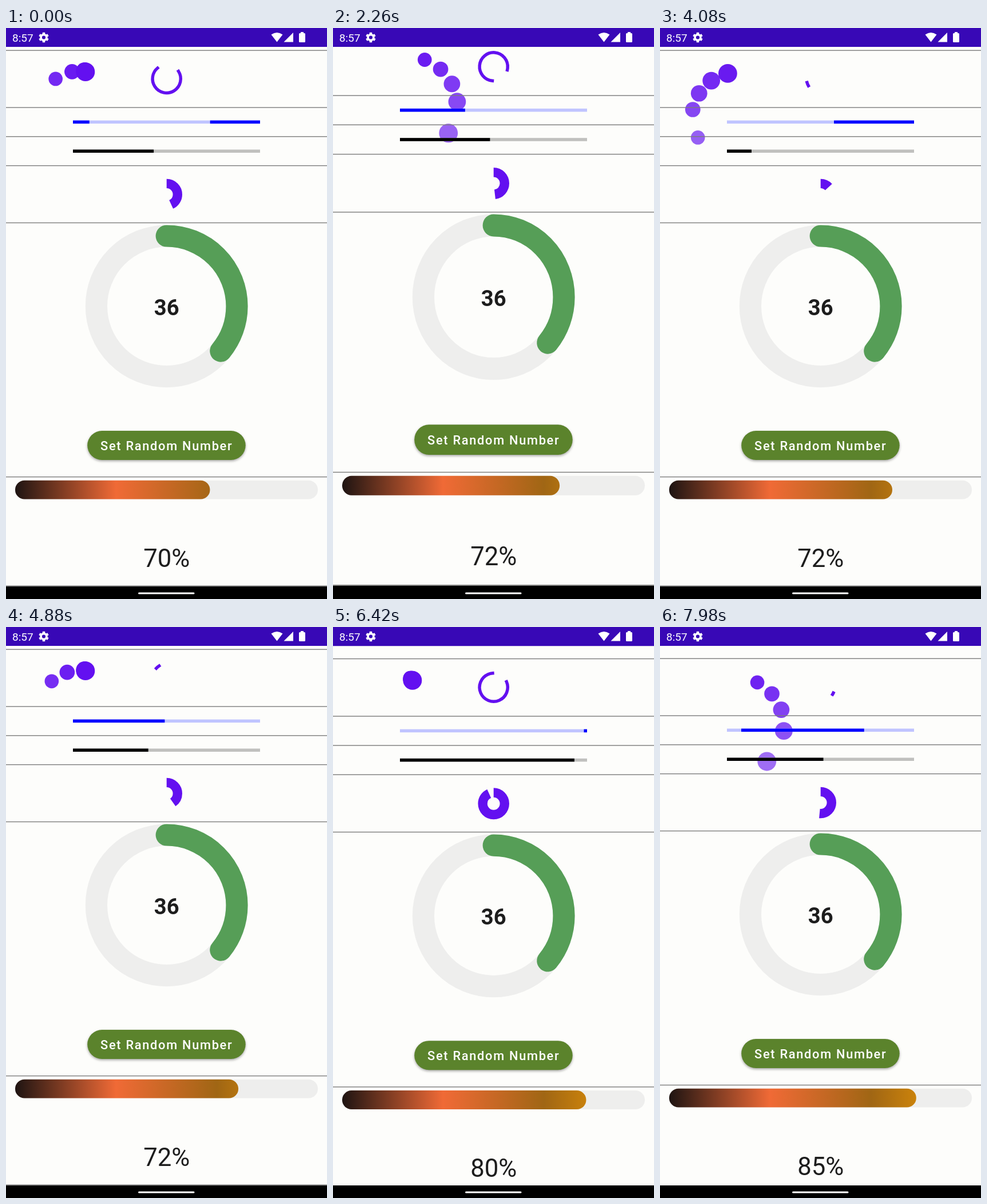
An HTML page with a canvas for the animation above (8 s loop, 561x998 px).

```html
<!DOCTYPE html>
<html lang="en">
<head>
<meta charset="utf-8">
<title>Progress indicators</title>
<style>
  html, body { margin: 0; width: 100%; height: 100%; overflow: hidden; background: #fdfdfb; }
  canvas { display: block; }
</style>
</head>
<body>
<canvas id="stage" width="561" height="998"></canvas>
<script>
const ctx = document.getElementById('stage').getContext('2d');
const TAU = Math.PI * 2, LOOP = 8000;
const FREEZE_START = 1000, FREEZE_END = 2260;
const W = 561, CX = 280.7, TOP = 33, BOTTOM = 976, MAX_SCROLL = 16;
const PURPLE = '#6310f0', FONT = 'Roboto, sans-serif';

// Playback runs in slow motion: [playback time, indicator clock]
const pace = [[0, 0], [1000, 580], [2260, 1050], [3380, 1417], [4080, 1700],
  [5460, 2168], [6420, 2501], [7980, 3084]];
const percents = [62, 70, 72, 80, 85];

const clamp = (v, lo = 0, hi = 1) => Math.min(hi, Math.max(lo, v));
const mod = (v, n) => ((v % n) + n) % n;
const smooth = (from, to, t) => {
  const x = clamp((t - from) / (to - from));
  return x * x * (3 - 2 * x);
};

function clockAt(time) {
  const i = pace.findIndex(([t]) => t > time);
  const end = i < 0 ? pace.length - 1 : i;
  const [t0, c0] = pace[end - 1], [t1, c1] = pace[end];
  return c0 + (c1 - c0) * (time - t0) / (t1 - t0);
}

// Cubic easing whose control points have y = 0 and y = 1
const ease = (x1, x2) => x => {
  x = clamp(x);
  let lo = 0, hi = 1;
  for (let i = 0; i < 24; i++) {
    const s = (lo + hi) / 2, r = 1 - s;
    if (3 * s * r * r * x1 + 3 * s * s * r * x2 + s ** 3 < x) lo = s; else hi = s;
  }
  return lo * lo * (3 - 2 * lo);
};
const standard = ease(.4, .2);
const firstHead = ease(.2, .8), firstTail = ease(.4, 1);
const secondHead = ease(0, .65), secondTail = ease(.1, .45);

// Below 0: stretch at the bottom; 0 to MAX_SCROLL: scroll; above: stretch at the top
let drag = 0;
function dragAt(time) {
  if (time < FREEZE_END) return 0;
  return -21.5 * (1 - smooth(2900, 3742, time))
    + 33.6 * smooth(5060, 5460, time) - 17.6 * smooth(5860, 6645, time);
}
const bottomStretch = () => Math.max(-drag, 0);
const topStretch = () => Math.max(drag - MAX_SCROLL, 0);
const bend = u => .06 + u * (1.74 - .8 * u);

function warp(y) {
  y += clamp(drag, 0, MAX_SCROLL);
  return y - bottomStretch() * bend((975 - y) / 943) + topStretch() * bend((y - TOP) / 943);
}

// Draws around the point (x, y) of the scrolled page, stretched with it
function place(x, y, draw) {
  ctx.save();
  ctx.translate(x, warp(y));
  ctx.scale(1, (warp(y + 5) - warp(y - 5)) / 10);
  draw();
  ctx.restore();
}

function disc(r, color) {
  ctx.fillStyle = color;
  ctx.beginPath();
  ctx.arc(0, 0, r, 0, TAU);
  ctx.fill();
}

// Angles in degrees, clockwise from the top
function arc(r, width, color, from, to, cap = 'butt') {
  ctx.strokeStyle = color;
  ctx.lineWidth = width;
  ctx.lineCap = cap;
  ctx.beginPath();
  ctx.arc(0, 0, r, (from - 90) * TAU / 360, (to - 90) * TAU / 360);
  ctx.stroke();
}

function pill(x, y, w, h, color) {
  ctx.fillStyle = color;
  ctx.beginPath();
  ctx.roundRect(x, y, w, h, h / 2);
  ctx.fill();
}

function label(text, y, size, weight, color, spacing = 0) {
  ctx.font = `${weight} ${size}px ${FONT}`;
  ctx.letterSpacing = spacing + 'px';
  ctx.textAlign = 'center';
  ctx.fillStyle = color;
  ctx.fillText(text, 0, y);
}

function bar(y, color, track, segments) {
  place(117, y, () => {
    ctx.fillStyle = track;
    ctx.fillRect(0, -2.8, 327, 5.5);
    ctx.fillStyle = color;
    for (const [a, b] of segments) if (b > a) ctx.fillRect(a * 327, -2.8, (b - a) * 327, 5.5);
  });
}

function chasingDots(clock) {
  for (let i = 4; i >= 0; i--) {
    const t = mod(clock - 567 - i * 100, 2000) / 400;
    // Quarter turn, fast half turn, quarter turn, rest
    const angle = 90 * (clamp(t) + 2 * clamp(t - 1) + clamp(t - 2));
    const r = 16.4 - i * 1.02, a = angle * TAU / 360;
    const x = 122.5 + 79.2 * Math.sin(a) + r, y = 139.5 - 79.2 * Math.cos(a) + r;
    place(x, y, () => {
      ctx.globalAlpha = .5 + Math.abs(angle - 180) / 360;
      disc(r, PURPLE);
    });
  }
}

function spinner(clock) {
  const t = clock + 2114, turn = Math.floor(t / 1332), phase = mod(t, 1332);
  const head = 290 * standard(phase / 666), tail = 290 * standard((phase - 666) / 666);
  const start = 216 * turn + 286 * phase / 1332 + tail + 5.73;
  place(CX, 88.8, () => arc(24.6, 5.46, PURPLE, start, start + Math.max(head - tail, .1), 'square'));
}

function sweepingBar(clock) {
  const t = mod(clock + 1033, 1800);
  bar(164.4, '#0000ff', '#c0c4ff', [
    [firstTail((t - 333) / 850), firstHead(t / 750)],
    [secondTail((t - 1267) / 533), secondHead((t - 1000) / 567)]
  ]);
}

function gauge() {
  place(CX, 486.3, () => {
    arc(122.8, 38.2, '#eeeeed', 0, 360);
    arc(122.8, 38.2, '#569e57', 0, 129.6, 'round');
    label('36', 15.5, 38.2, 700, '#1d1d1d');
  });
}

function button() {
  place(CX, 729.5, () => {
    ctx.save();
    ctx.shadowColor = 'rgba(0,0,0,.35)';
    ctx.shadowBlur = 4;
    ctx.shadowOffsetY = 2;
    pill(-138.5, -25.5, 276.5, 51, '#5b832c');
    ctx.restore();
    label('Set Random Number', 8.5, 21.8, 500, '#fff', 1.7);
  });
}

function gradientBar(clock) {
  const elapsed = clock - 80, step = Math.max(0, Math.floor(elapsed / 960));
  const from = percents[step], to = percents[step + 1];
  const value = (from + (to - from) * standard((elapsed - step * 960) / 760)) / 100;
  place(16, 807.2, () => {
    const gradient = ctx.createLinearGradient(0, 0, 529, 0);
    ['#1e1412', '#f06a36', '#a06614', '#ffa500'].forEach((c, i) => gradient.addColorStop(i / 3, c));
    pill(0, -16.4, 529, 32.8, '#eeeeed');
    pill(0, -16.4, 32.8 + value * 496.2, 32.8, gradient);
  });
  place(CX, 926, () => label(to + '%', 15.5, 43.7, 400, '#1d1d1d'));
}

function systemBars() {
  ctx.fillStyle = '#3808b6';
  ctx.fillRect(0, 0, W, TOP + topStretch() * bend(0));
  ctx.fillStyle = '#fff';
  ctx.font = `400 19px ${FONT}`;
  ctx.letterSpacing = '0px';
  ctx.textAlign = 'left';
  ctx.fillText('8:57', 11, 23.5);

  // Gear
  ctx.save();
  ctx.translate(66, 16.5);
  arc(4.9, 3.6, '#fff', 0, 360);
  for (let i = 0; i < 6; i++) {
    ctx.rotate(TAU / 6);
    ctx.fillRect(-2.2, -8.7, 4.4, 4);
  }
  ctx.restore();

  // Wi-Fi, signal and battery
  ctx.beginPath();
  ctx.moveTo(473.5, 24.5);
  ctx.lineTo(463.5, 11.5);
  ctx.quadraticCurveTo(473.5, 4.5, 483.5, 11.5);
  ctx.closePath();
  ctx.moveTo(485.5, 24.5);
  ctx.lineTo(502, 24.5);
  ctx.lineTo(502, 8);
  ctx.closePath();
  ctx.roundRect(512, 9, 11, 16, 1.5);
  ctx.rect(515, 7, 5, 2);
  ctx.fill('nonzero');

  const navTop = BOTTOM - bottomStretch() * bend(0);
  ctx.fillStyle = '#000';
  ctx.fillRect(0, navTop, W, 998 - navTop);
  pill(231, 986.5, 98.5, 3, '#fff');
}

function render(time) {
  if (time > FREEZE_START && time < FREEZE_END) time = FREEZE_START;
  const clock = clockAt(time);
  drag = dragAt(time);

  ctx.fillStyle = '#fdfdfb';
  ctx.fillRect(0, 0, W, 998);
  chasingDots(clock);
  spinner(clock);
  for (const y of [39.2, 139, 189.8, 240.6, 340.5, 784.6, 975])
    place(0, y, () => {
      ctx.fillStyle = '#7c7c7c';
      ctx.fillRect(0, -.7, W, 1.4);
    });
  sweepingBar(clock);
  const progress = mod(.431 + clock / 1000, 1);
  bar(215.3, '#000', '#c0c0be', [[0, progress]]);
  place(CX, 291, () => arc(19.1, 16.4, PURPLE, 0, progress * 360));
  gauge();
  button();
  gradientBar(clock);
  systemBars();
}

const began = performance.now();
function frame() {
  render((performance.now() - began) % LOOP);
  requestAnimationFrame(frame);
}
frame();
</script>
</body>
</html>
```
